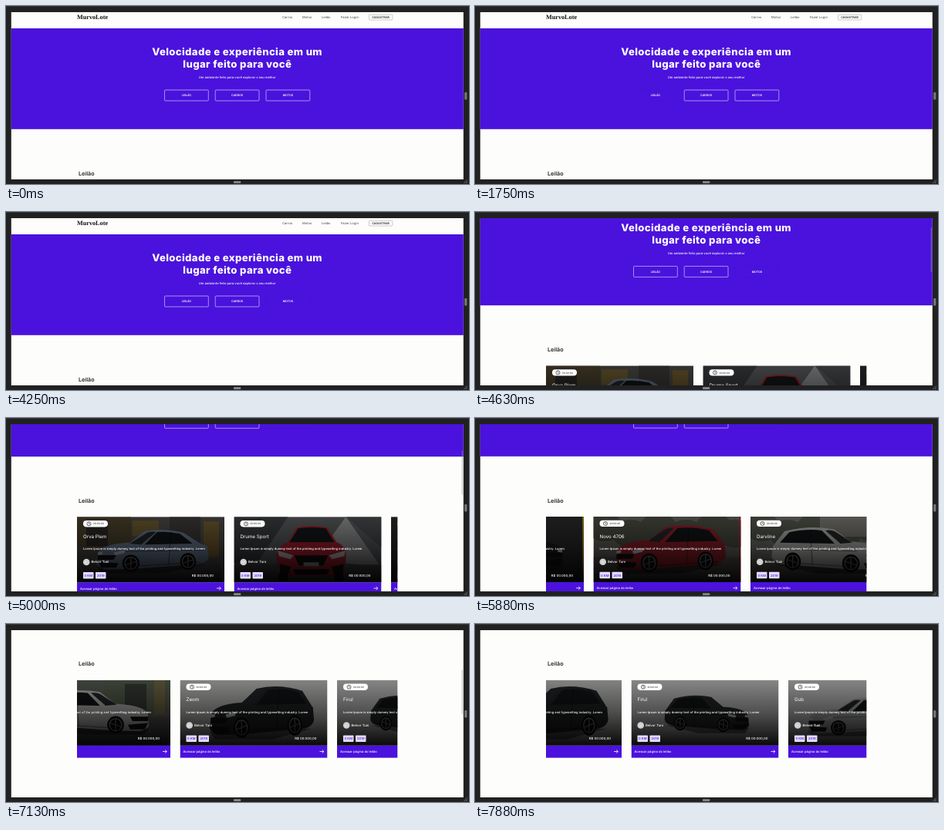
An HTML page that plays this animation: 600 by 231 pixels, repeating every 8 s.

```html
<!DOCTYPE html>
<html lang="pt">
<head>
<meta charset="utf-8">
<style>
  html, body { margin: 0; width: 100%; height: 100%; overflow: hidden; background: #212121; }
  #stage {
    display: block; width: 600px; height: 231px;
    font-family: Inter, "Open Sans", sans-serif; text-rendering: geometricPrecision;
  }
</style>
</head>
<body>
<svg id="stage" viewBox="0 0 600 231" xmlns="http://www.w3.org/2000/svg"></svg>
<script>
const LOOP = 8000, STEP = 125;
const BLUE = '#4a12dc', PAPER = '#fdfdfc';
const CARD = { x: 92, y: 238, w: 191, photo: 85, foot: 16, pitch: 203.5 };

const rect = (x, y, w, h, fill, extra = '') =>
  `<rect x="${x}" y="${y}" width="${w}" height="${h}" fill="${fill}" ${extra}/>`;
const text = (x, y, size, str, fill = '#fff', extra = '') =>
  `<text x="${x}" y="${y}" font-size="${size}" fill="${fill}" ${extra}>${str}</text>`;
const shape = (d, fill, extra = '') => `<path d="${d}" fill="${fill}" ${extra}/>`;
const middle = 'text-anchor="middle"';

// Three-quarter view in a 100 x 50 box, nose to the right.
function car(x, y, w, h, paint, { flip = false, sedan = false } = {}) {
  const move = flip
    ? `translate(${x + w} ${y}) scale(${-w / 100} ${h / 50})`
    : `translate(${x} ${y}) scale(${w / 100} ${h / 50})`;
  const roof = sedan
    ? 'M8 17 L23 5 Q40 -1 57 3 L73 19Z'
    : 'M3 19 L12 5 Q34 -2 55 3 L72 19Z';
  const side = sedan
    ? 'M15 17 L26 6 Q36 3 46 4 L57 18Z'
    : 'M8 17 L16 6 Q31 2 44 4 L55 18Z';
  const wheel = (cx, cy, rx) => `<ellipse cx="${cx}" cy="${cy}" rx="${rx}" ry="9.5" fill="#0c0c0c"/>
    <ellipse cx="${cx}" cy="${cy}" rx="${rx * .72}" ry="6.8" fill="none" stroke="#8d8d8d"/>
    ${shape(`M${cx} ${cy - 6.5} V${cy + 6.5} M${cx - rx * .65} ${cy - 2} L${cx + rx * .65} ${cy + 2}`, 'none', 'stroke="#777"')}`;
  return `<g transform="${move}">
    ${shape('M3 40 L99 43 L94 50 H40Z', '#111', 'opacity=".5"')}
    ${shape(roof, paint)}
    ${shape('M2 20 Q8 15 20 16 H72 Q92 18 97 25 L99 40 Q96 46 88 46 L64 45 L10 40 Q2 38 1 32Z', paint)}
    ${shape(side, '#16191b')}
    ${shape('M47 4 Q52 3 55 5 L70 17 L60 18Z', '#2b3033')}
    ${shape('M34 4 L36 41 M4 24 L74 26 M8 38 L62 42', 'none', 'stroke="#000" stroke-opacity=".4" stroke-width=".9"')}
    ${shape('M74 24 L84 27 L83 30 L75 28Z M94 26 L98 27 V30 L94 29Z', '#e6e9eb')}
    ${shape('M82 30 H98 V35 H84Z M80 39 L98 37 L95 44 H82Z', '#151515')}
    ${wheel(19, 37, 7)}${wheel(69, 39, 7.5)}</g>`;
}

const frontCar = (x, y, paint) => `<g transform="translate(${x} ${y})">
  ${shape('M16 22 L27 3 Q46 -2 67 3 L79 22 Q92 26 91 44 L88 66 H5 L1 44 Q1 27 16 22Z', paint)}
  ${shape('M18 22 L29 4 Q46 1 65 4 L76 22Z', '#191c1e')}
  ${shape('M3 33 L23 39 L19 44 L4 40Z M90 33 L69 39 L73 44 L89 40Z', '#e4e4e4')}
  ${shape('M24 39 H68 L62 52 H30Z M5 50 L20 54 L16 63 H6Z M88 50 L72 54 L76 63 H87Z M22 57 H70 L66 64 H26Z', '#141414')}
  ${rect(36, 48, 20, 5, '#bbb')}
  ${rect(4, 62, 12, 11, '#111', 'rx="3"')}${rect(76, 62, 12, 11, '#111', 'rx="3"')}</g>`;

const back = fill => rect(0, 0, CARD.w, CARD.photo, fill);
const trees = fill => [15, 48, 84, 120, 156, 184].map((x, i) =>
  `<ellipse cx="${x}" cy="${14 + i % 2 * 8}" rx="24" ry="18" fill="${fill}"/>`).join('');

const cars = [
  ['Orva Plem', back('#5c5b56') + rect(0, 0, 70, 40, '#5d5137') + rect(12, 4, 28, 34, '#35322d')
    + rect(72, 5, 34, 20, '#85703a') + rect(120, 0, 40, 42, '#4a4743') + rect(164, 6, 20, 48, '#8a7038')
    + rect(0, 52, 191, 33, '#606060') + car(24, 15, 148, 58, '#8298b4', { sedan: true, flip: true })],
  ['Drume Sport', back('#6c6f72') + shape('M0 0 H70 L30 60 H0Z', '#484b4e')
    + shape('M105 55 L145 0 L191 66Z', '#b2b3b4') + shape('M145 0 H191 V40Z', '#5b5d60')
    + rect(0, 62, 191, 23, '#5f5f5f') + frontCar(54, 11, '#d32637')],
  ['Lumbra', back('#333435') + car(18, 12, 148, 58, '#222426') + rect(189, 0, 2, 85, '#d2a928')],
  ['Novo 4706', back('#7c7b74') + trees('#5b5e50') + rect(0, 52, 191, 33, '#6f6d67')
    + car(27, 10, 146, 64, '#b72534', { flip: true }) + rect(189, 0, 2, 85, '#e22d42')],
  ['Darvilne', back('#8a8b85') + trees('#666a5e') + rect(90, 0, 60, 26, '#98958e')
    + rect(0, 55, 191, 30, '#7c7a75') + car(26, 13, 151, 61, '#e0e0de')],
  ['Quelmo', back('#70746a') + rect(104, 0, 87, 42, '#6b7561') + rect(132, 5, 28, 35, '#434a42')
    + rect(170, 0, 14, 45, '#8c8255') + rect(0, 48, 191, 37, '#6a6a6a')
    + car(20, 12, 145, 59, '#e6e6e4')],
  ['Zeom', back('#e8e8e5') + car(37, 7, 138, 70, '#292b2d', { flip: true })],
  ['Firul', back('#efefef') + car(42, 19, 112, 50, '#303234')],
  ['Gub', back('#ededed') + car(24, 22, 132, 51, '#c9cacb', { flip: true })]
];

function card([name, photo], i) {
  const tag = (x, label) => rect(x, 71.7, 13.5, 8.6, '#e4dcfb', 'rx=".8"')
    + text(x + 6.75, 77.5, 4.1, label, BLUE, `${middle} font-weight="500"`);
  return `<svg x="${CARD.x + i * CARD.pitch}" y="${CARD.y}" width="${CARD.w}" height="${CARD.photo + CARD.foot}">
    ${photo}${back('url(#shade)')}
    ${rect(8, 4.8, 32, 8.3, '#fff', 'rx="4.1"')}
    <circle cx="15.5" cy="9" r="2.5" fill="none" stroke="#222" stroke-width=".7"/>
    ${shape('M15.5 7.4 V9 L16.7 9.7', 'none', 'stroke="#222" stroke-width=".6"')}
    ${text(21, 10.2, 3.1, '20:00:00', '#333', 'font-weight="500"')}
    ${text(8, 27.6, 6.2, name)}
    ${text(8, 42.9, 4.05, 'Lorem Ipsum is simply dummy text of the printing and typesetting industry. Lorem', '#fff', 'font-weight="500"')}
    <circle cx="12.2" cy="58.7" r="4.3" fill="#d0d0d0"/>
    ${text(12.2, 59.8, 2.8, 'BT', '#f4f4f4', middle)}
    ${text(18.4, 60.2, 4.3, 'Belvor Tuni', '#fff', 'font-weight="500"')}
    ${tag(8, '0 KM')}${tag(24, '2019')}
    ${text(177, 77.7, 4.3, 'R$ 00.000,00', '#fff', 'text-anchor="end" font-weight="500"')}
    ${rect(0, CARD.photo, CARD.w, CARD.foot, BLUE)}
    ${text(4, 94.4, 4.1, 'Acessar página do leilão', '#fff', 'font-weight="500"')}
    ${shape('M181 92.7 H186.3 M184.2 90.6 L186.4 92.7 L184.2 94.8', 'none', 'stroke="#fff" stroke-width=".8"')}
  </svg>`;
}

const buttons = [['LEILÃO', 205.5], ['CARROS', 271.2], ['MOTOS', 337]];
const button = ([label, x]) =>
  `<rect class="btn" x="${x}" y="109" width="56.8" height="14" rx="1" fill="none" stroke-width=".7"/>`
  + text(x + 28.4, 117.2, 3.6, label, '#fff', `${middle} font-weight="600"`);

const nav = [['Carros', 358], ['Motos', 384], ['Leilão', 409], ['Fazer Login', 434]];
const title = 'font-weight="800" letter-spacing=".35" text-anchor="middle"';

document.getElementById('stage').innerHTML = `
  <defs>
    <linearGradient id="shade" x2="0" y2="1">
      <stop offset="0" stop-opacity=".44"/><stop offset=".5" stop-opacity=".67"/>
      <stop offset="1" stop-opacity=".96"/>
    </linearGradient>
    <clipPath id="view">${rect(6.8, 8, 586, 217, '#000')}</clipPath>
    <clipPath id="rail">${rect(92, 230, 415.3, 120, '#000')}</clipPath>
  </defs>
  ${rect(0, 0, 600, 231, '#212121')}${rect(0, 0, 600, 1, '#343434')}
  <g clip-path="url(#view)">
    ${rect(6, 8, 587, 218, PAPER)}
    <g id="page">
      ${text(92, 17.3, 8.2, 'MurvoLote', '#111', 'font-family="Liberation Serif, serif" font-weight="700"')}
      ${nav.map(([label, x]) => text(x, 16.2, 4.15, label, '#444')).join('')}
      ${rect(470.5, 11.2, 30.3, 6.8, PAPER, 'rx="1" stroke="#aaa" stroke-width=".6"')}
      ${text(485.6, 16, 3.7, 'CADASTRAR', '#222', `${middle} font-weight="600"`)}
      ${rect(6, 29, 587, 130.8, BLUE)}
      ${text(299.6, 64, 13.2, 'Velocidade e experiência em um', '#fff', title)}
      ${text(299.8, 79.7, 13.2, 'lugar feito para você', '#fff', title)}
      ${text(299.6, 94, 4.1, 'Um ambiente feito para você explorar o seu melhor', '#fff', `${middle} font-weight="500"`)}
      ${buttons.map(button).join('')}
      ${text(94, 219.6, 7.2, 'Leilão', '#222', 'font-weight="600"')}
      <g clip-path="url(#rail)"><g id="track">${cars.map(card).join('')}</g></g>
    </g>
    <rect id="thumb" x="590.5" width="1.6" height="58" rx=".8" fill="#999" opacity=".4"/>
  </g>
  ${rect(594.2, 112, 3.2, 9.5, '#777', 'rx=".8"')}
  ${rect(295, 227.3, 9.3, 2.8, '#888', 'rx=".8"')}
  ${shape('M593.5 230 L598 225.5 M596 230 L598 228', 'none', 'stroke="#999" stroke-width=".7"')}`;

const page = document.getElementById('page');
const track = document.getElementById('track');
const thumb = document.getElementById('thumb');
const frames = [...document.querySelectorAll('.btn')];

const scrollKeys = [[4375, 0], [5000, 109.7], [5875, 110], [6625, 110], [6750, 110.7], [7125, 165.2]];
const slideKeys = [[5125, 0], [5875, 549], [6000, 549], [6250, 1087.5], [7250, 1087.5], [7625, 1314]];
const hovers = [[1125, 2500], [2875, 3625], [3750, LOOP]];
const within = (t, [from, to]) => t >= from && t < to;

function ease(keys, t) {
  const next = keys.findIndex(([at]) => at > t);
  if (next === 0) return keys[0][1];
  if (next < 0) return keys[keys.length - 1][1];
  const [t0, a] = keys[next - 1], [t1, b] = keys[next];
  const k = (t - t0) / (t1 - t0);
  return a + (b - a) * k * k * (3 - 2 * k);
}

function draw(ms) {
  const t = Math.floor((ms % LOOP) / STEP) * STEP;
  const scroll = ease(scrollKeys, t);
  page.setAttribute('transform', `translate(0 ${-scroll})`);
  track.setAttribute('transform', `translate(${-ease(slideKeys, t)} 0)`);
  thumb.setAttribute('y', 8 + scroll * 0.31);
  thumb.setAttribute('visibility', within(t, [4500, 5500]) || within(t, [6750, 7250]) ? 'visible' : 'hidden');
  frames.forEach((el, i) => {
    const on = within(t, hovers[i]);
    el.setAttribute('stroke', on ? '#3f10b8' : '#cfc4f8');
    el.setAttribute('stroke-dasharray', on ? '1 3' : 'none');
  });
}

const start = performance.now();
function tick() {
  draw(performance.now() - start);
  requestAnimationFrame(tick);
}
tick();
</script>
</body>
</html>
```
